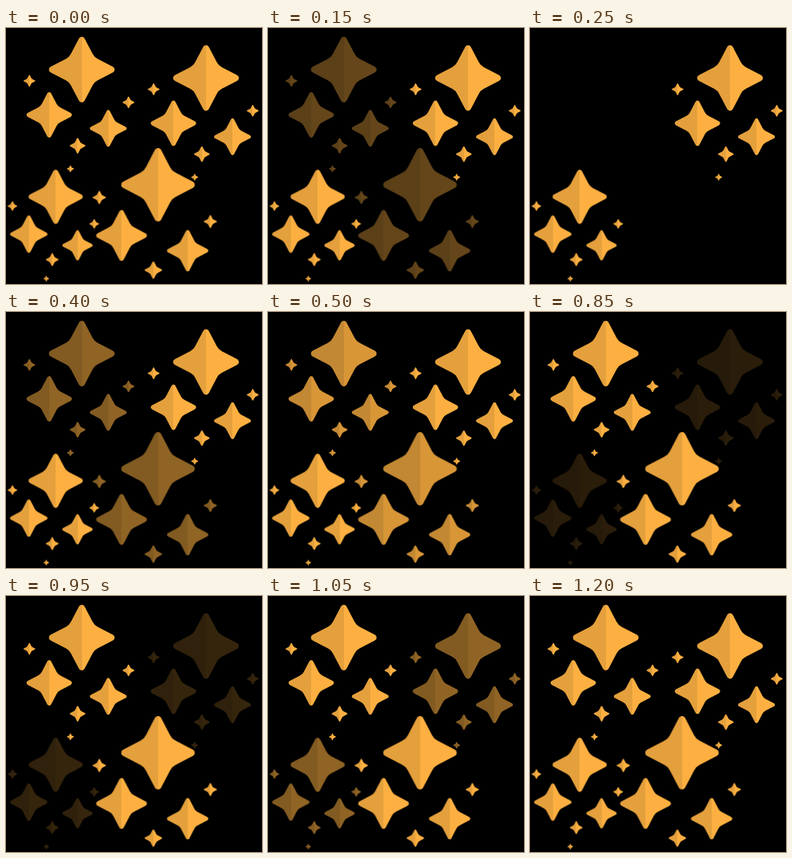
An HTML page for the animation above (1250 ms loop, 320 px wide and 320 px high).

```html
<!DOCTYPE html>
<html lang="en">
<head>
<meta charset="utf-8">
<title>Twinkling stars</title>
<style>
  html, body { margin: 0; width: 100%; height: 100%; overflow: hidden; background: #000; }
  svg { display: block; width: 100vw; height: 100vh; }
  .first, .second { animation: 1250ms -1ms infinite; }
  .first { animation-name: twinkle-first; }
  .second { animation-name: twinkle-second; }
  @keyframes twinkle-first {
    0% { opacity: 1; animation-timing-function: steps(5, end); }
    20% { opacity: 0; animation-timing-function: steps(3, end); }
    32% { opacity: .57; animation-timing-function: steps(3, end); }
    44%, 100% { opacity: 1; }
  }
  @keyframes twinkle-second {
    0%, 44% { opacity: 1; animation-timing-function: steps(7, end); }
    72% { opacity: .03; animation-timing-function: steps(3, end); }
    84% { opacity: .57; animation-timing-function: steps(3, end); }
    96%, 100% { opacity: 1; }
  }
</style>
</head>
<body>
<svg viewBox="0 0 320 320">
  <defs>
    <linearGradient id="gold">
      <stop offset=".5" stop-color="#e4a03c"/>
      <stop offset=".5" stop-color="#fdb041"/>
    </linearGradient>
    <!-- One arm edge; the star is this curve turned through four quarters -->
    <path id="star" fill="url(#gold)"/>
    <!-- Seven stars around the largest one -->
    <g id="cluster">
      <use href="#star" transform="scale(.41)"/>
      <use href="#star" transform="translate(-40.7 56.6) scale(.283)"/>
      <use href="#star" transform="translate(33.1 73.5) scale(.23)"/>
      <use href="#star" transform="translate(-65.5 14.1) scale(.073)"/>
      <use href="#star" transform="translate(58.4 41) scale(.073)"/>
      <use href="#star" transform="translate(-5.2 95.2) scale(.097)"/>
      <use href="#star" transform="translate(-14.2 124) scale(.043)"/>
    </g>
  </defs>
  <g class="first">
    <use href="#cluster" transform="translate(94.7 52)"/>
    <use href="#cluster" transform="translate(190 196) scale(1.12)"/>
  </g>
  <g class="second">
    <use href="#cluster" transform="translate(250 62.5)"/>
    <use href="#cluster" transform="translate(62 211) scale(.825)"/>
  </g>
</svg>
<script>
  // Rounded tip, straight flank, soft inner corner, straight flank
  const arm = [[4, -100], [7, -98], [9, -94], [33, -48], [38, -38], [48, -33], [94, -9], [98, -7], [100, -4], [100, 0]];
  const turn = ([x, y]) => [-y, x];

  let points = arm;
  let d = 'M0-100';
  for (let i = 0; i < 4; i++) {
    const [a, b, c, e, f, g, h, j, k, l] = points;
    d += `C${a} ${b} ${c}L${e}Q${f} ${g}L${h}C${j} ${k} ${l}`;
    points = points.map(turn);
  }
  document.getElementById('star').setAttribute('d', d + 'Z');
</script>
</body>
</html>
```
